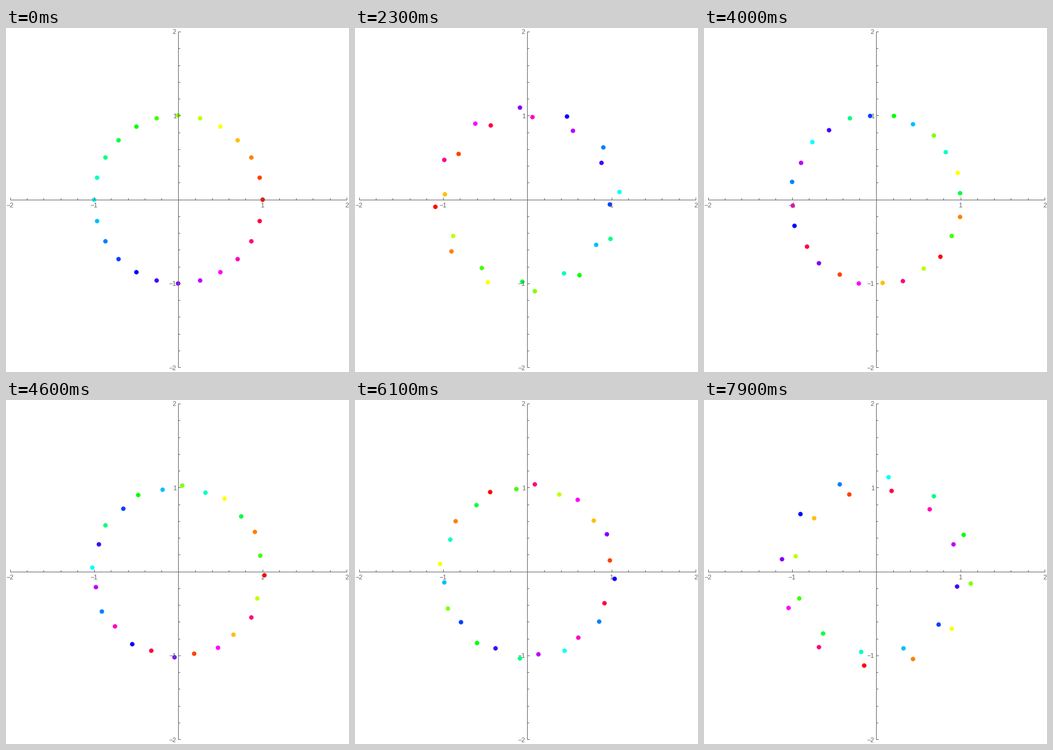
Write a matplotlib script that moves like this. It is 576x579 px and loops after 8000 ms.

```python
import numpy as np
import matplotlib.pyplot as plt
from matplotlib.animation import FuncAnimation
from matplotlib.colors import hsv_to_rgb

W, H, DPI = 576, 579, 64
PT = 72 / DPI                 # points per pixel
CX, CY, UNIT = 289.4, 288.6, 141.3
GRAY = "0.4"
FRAMES, INTERVAL = 80, 100
N = 24

SPIN = 6.227                  # degrees per frame shared by all dots
SWAP = 14.25                  # frames per exchange of neighbours
LEAD = 0.777                  # part of the exchange made by the outer ring

fig = plt.figure(figsize=(W / DPI, H / DPI), dpi=DPI, facecolor="white")
ax = fig.add_axes([0, 0, 1, 1])
ax.set_xlim(0, W)
ax.set_ylim(H, 0)
ax.axis("off")


def line(xs, ys):
    ax.plot(xs, ys, color=GRAY, lw=PT, zorder=3, solid_capstyle="butt")


def label(x, y, value, ha):
    text = str(value).replace("-", "\u2212")
    ax.text(x, y, text, ha=ha, va="center_baseline", color=GRAY, zorder=3,
            family="Liberation Sans", fontsize=11 * PT)


def draw_axes():
    reach = 2 * UNIT
    line([CX - reach, CX + reach], [CY, CY])
    line([CX, CX], [CY - reach, CY + reach])
    for i in range(-10, 11):
        if i == 0:
            continue
        major = i % 5 == 0
        size = 4 if major else 2.8
        x, y = CX + i / 5 * UNIT, CY - i / 5 * UNIT
        line([x, x], [CY, CY - size])
        line([CX, CX + size], [y, y])
        if major:
            label(x, 298.5, i // 5, "center")
            label(286, y + 0.4, i // 5, "right")


def ring_state(frame):
    """Angles (degrees) and radii of the outer and the inner ring."""
    step, q = divmod(frame / SWAP, 1)
    d = q - 0.188 * np.sin(2 * np.pi * q) + 0.033 * np.sin(4 * np.pi * q)
    gap = 30 * (step + d)
    bump = 4 * d * (1 - d)
    base = SPIN * frame
    outer = base + LEAD * gap, 1 + 0.135 * bump
    inner = base - (1 - LEAD) * gap, 1 - 0.027 * bump
    return outer, inner


def positions(frame):
    """Dot centres, snapped to whole pixels."""
    (a0, r0), (a1, r1) = ring_state(frame)
    k = np.arange(N)
    even = k % 2 == 0
    angle = np.radians(15 * k + np.where(even, a0, a1))
    radius = UNIT * np.where(even, r0, r1)
    xy = np.column_stack([CX + radius * np.cos(angle),
                          CY - radius * np.sin(angle)])
    return np.floor(xy + 0.5)


draw_axes()
colors = hsv_to_rgb([(k / N, 1, 1) for k in range(N)])
start = positions(0)
dots = ax.scatter(start[:, 0], start[:, 1], s=(7.5 * PT) ** 2, c=colors,
                  linewidths=0, zorder=2, snap=False)


def update(frame):
    dots.set_offsets(positions(frame))
    return dots,


anim = FuncAnimation(fig, update, frames=FRAMES, interval=INTERVAL,
                     repeat=True, repeat_delay=0)
plt.show()
```
